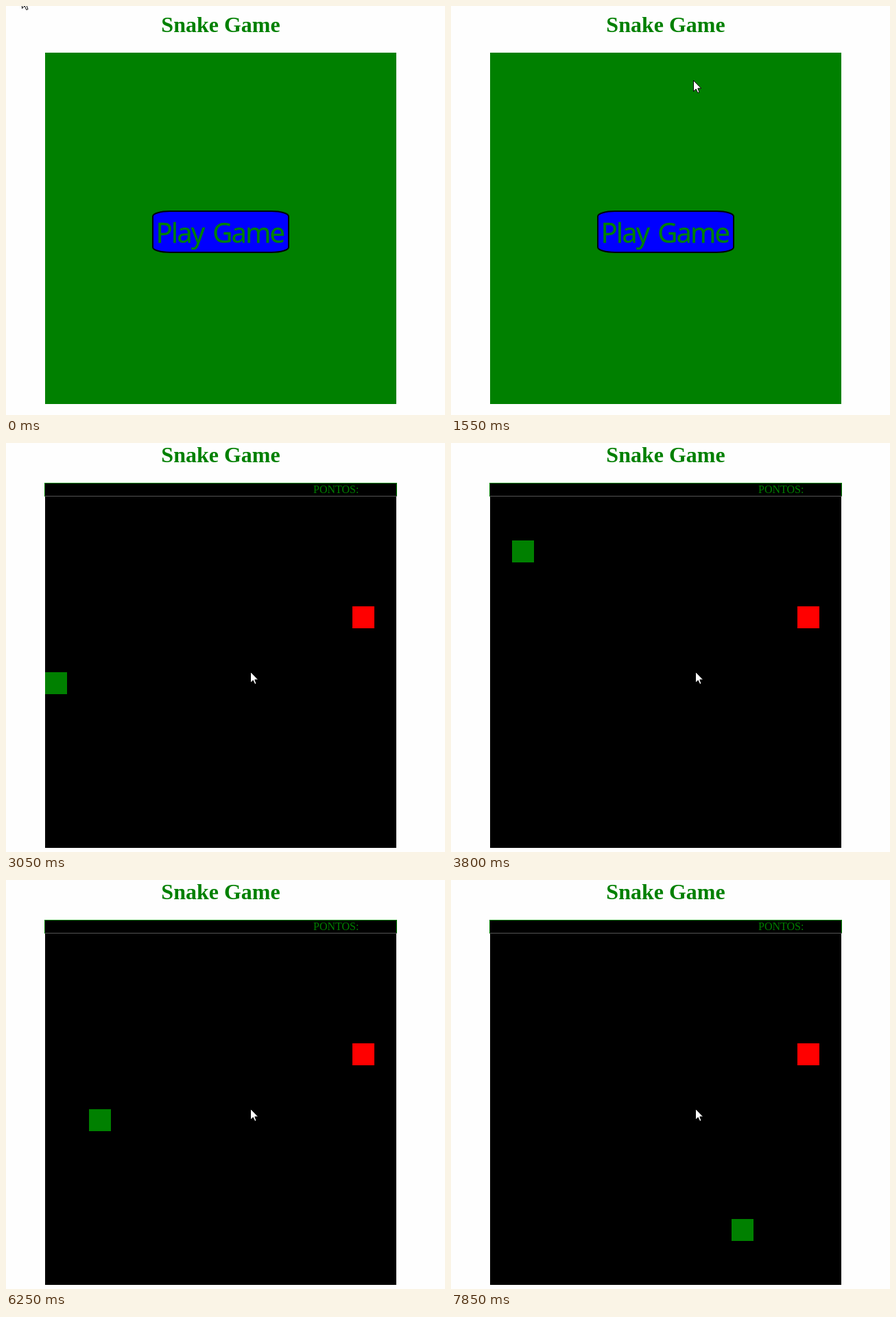
Write an HTML page that moves like this. It is 640x596 px and loops after 8 s.

```html
<!DOCTYPE html>
<html lang="pt">
<head>
<meta charset="utf-8">
<title>Snake Game</title>
<style>
  html, body { margin: 0; width: 100%; height: 100%; overflow: hidden; background: #fefefe; }
  svg { position: absolute; left: 0; top: 0; display: block; }
  rect { shape-rendering: crispEdges; }
  .title { font: bold 32px "Liberation Serif", "Times New Roman", serif; fill: #008000; text-anchor: middle; }
  .score { font: 16px "Liberation Serif", "Times New Roman", serif; fill: #008000; }
  .play { font: 40px "Noto Sans", "Open Sans", sans-serif; letter-spacing: -1.9px; word-spacing: 4.5px; }
  .button { color: #008000; }
  .button text { fill: currentColor; stroke: currentColor; stroke-width: .3; }
  .button rect { fill: #00f; stroke: #000; stroke-width: 2; shape-rendering: auto; }
  .button.hover { color: #fff; }
  .button.hover rect { fill: #008000; }
</style>
</head>
<body>
<svg width="640" height="596" viewBox="0 0 640 596">
  <text id="title" class="title" x="313" y="38">Snake Game</text>

  <g id="menu">
    <rect x="57" y="68" width="512" height="512" fill="#008000"/>
    <g id="button" class="button">
      <rect x="214" y="299" width="198" height="60" rx="25" ry="7.5"/>
      <text class="play" x="218.5" y="345">Play Game</text>
    </g>
  </g>

  <g id="board">
    <rect x="57" y="78" width="512" height="512"/>
    <rect x="505" y="238" width="32" height="32" fill="#f00"/>
    <rect id="snake" width="32" height="32" fill="#008000"/>
  </g>

  <g id="bar">
    <rect x="56" y="58" width="514" height="20" fill="#008000"/>
    <rect x="57" y="59" width="512" height="19"/>
    <rect x="57" y="77" width="513" height="1" fill="#555"/>
    <text class="score" x="448" y="73">PONTOS:</text>
  </g>

  <path id="cursor" d="M.5 .5V16.5L4.2 13L6.8 18.6L9 17.6L6.8 12H11.7Z" fill="#fff" stroke="#000"/>
</svg>
<script>
  const LOOP = 8000, TICK = 50, CELL = 32, COLS = 16;
  const $ = id => document.getElementById(id);
  const [title, menu, button, board, bar, snake, cursor] =
    ["title", "menu", "button", "board", "bar", "snake", "cursor"].map($);

  // time, x, y where the pointer turns
  const pointer = [
    [0, 23, -13], [500, 320, 305], [650, 376, 364], [1000, 365, 407],
    [1700, 350, 26], [1800, 356, 333]
  ];

  // time, column, row where the snake turns; columns run on past the edge
  const turns = [
    [2200, 8, 8], [3150, 18, 8], [3750, 18, 2], [4800, 10, 2], [5050, 10, 2],
    [5150, 10, 3], [5850, 19, 3], [6700, 19, 13], [7850, 28, 13]
  ];

  // place on a path at time t; snap rounds the distance covered on a leg
  function along(path, t, snap) {
    const i = path.findIndex(key => key[0] > t);
    if (i < 0) return path[path.length - 1].slice(1);
    if (i === 0) return path[0].slice(1);
    const [t0, ...from] = path[i - 1], [t1, ...to] = path[i];
    const k = (t - t0) / (t1 - t0);
    return from.map((a, n) => {
      const d = to[n] - a;
      return a + Math.sign(d) * snap(Math.abs(d) * k);
    });
  }

  const pointerAt = t => along(pointer, t, Math.round);
  const snakeAt = t => along(turns, t, d => Math.floor(d + 0.33));

  const inButton = ([x, y]) => x >= 213 && x < 413 && y >= 298 && y < 360;
  const show = (el, on) => { el.style.display = on ? "" : "none"; };
  const place = (el, x, y) => el.setAttribute("transform", `translate(${x} ${y})`);

  function draw(time) {
    const t = Math.floor((time % LOOP) / TICK) * TICK;

    title.setAttribute("y", t < 2050 ? 38 : 28);
    show(menu, t < 2050);
    show(bar, t >= 2100);
    show(board, t >= 2200);

    // the hover style trails the pointer by one tick
    button.classList.toggle("hover", inButton(pointerAt(t - TICK)));
    place(cursor, ...pointerAt(t));

    // one hidden column lies between the right and left edges
    const [x, row] = snakeAt(t), col = x % (COLS + 1);
    show(snake, col < COLS);
    place(snake, 57 + col * CELL, 78 + row * CELL);
  }

  const start = performance.now();
  function frame(now) {
    draw(Math.max(0, now - start));
    requestAnimationFrame(frame);
  }
  draw(0);
  requestAnimationFrame(frame);
</script>
</body>
</html>
```
